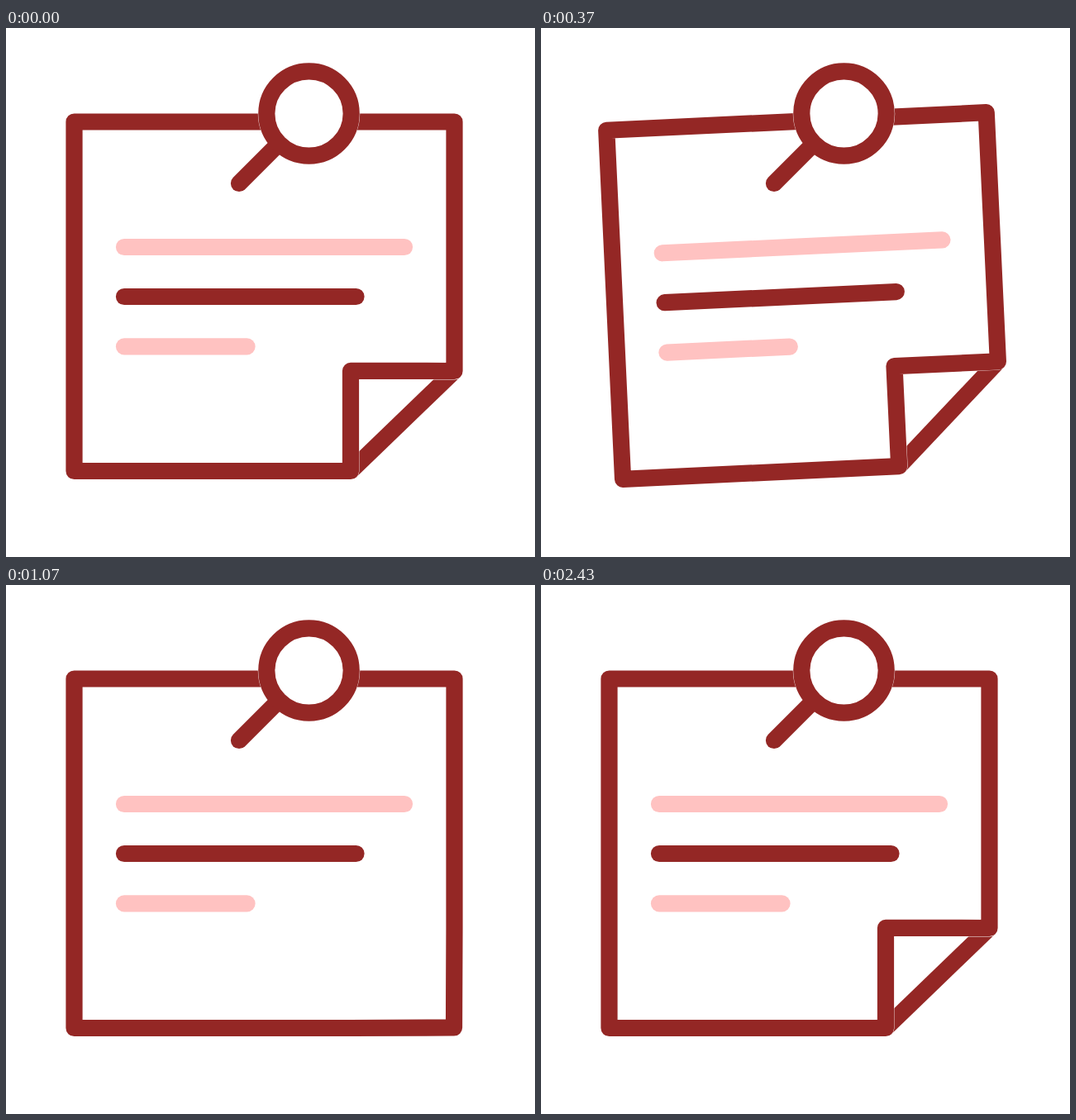
These frames come from a looping animation (640 by 640 pixels, 2500 ms). An HTML page:

```html
<!DOCTYPE html>
<html lang="en">
<head>
<meta charset="utf-8">
<title>Pinned note</title>
<style>
  html, body { margin: 0; width: 100%; height: 100%; overflow: hidden; background: #fff; }
  svg { display: block; width: 100%; height: 100%; }
  .ink { stroke: #942725; stroke-width: 20.2; }
  .soft { stroke: #ffc2c1; stroke-width: 20.2; }
  .seam { stroke: #fff; stroke-width: 20.9; }
  .round { stroke-linecap: round; stroke-linejoin: round; }
</style>
</head>
<body>
<svg viewBox="0 0 640 640" fill="none">
  <g id="note">
    <path class="ink" d="M542.5 415L417 536"/>
    <path id="halo" class="seam round" fill="#fff"/>
    <path id="sheet" class="ink round" fill="#fff"/>
    <path class="soft round line"/>
    <path class="ink round line"/>
    <path class="soft round line"/>
  </g>
  <circle cx="366.5" cy="103.5" r="61.7" fill="#fff"/>
  <path class="ink round" d="M282 188L330 140"/>
  <circle class="ink" cx="366.5" cy="103.5" r="51.2" fill="#fff"/>
</svg>
<script>
const LOOP = 2500, STEP = 100 / 3;
const PIVOT = '300 188';

// Keys are [frame, value]; frames run at 30 per second.
const SWING = [[1, 0], [6, 4], [10, -3], [15, 0]];
const FOLDED = [417, 414.8], LIFTED = [404.5, 395.5], FLAT = [542.5, 536];

// Each line is wiped away from the left, then redrawn after a short lag.
const LINES = [
  { y: 265, end: 482, span: 9.8, lag: 3.4 },
  { y: 325, end: 423.5, span: 7.7, lag: 2.9 },
  { y: 385.4, end: 291.5, span: 9.8, lag: 2.8 }
];
const LEFT = 143, WIPE = 17;

const note = document.getElementById('note');
const sheet = document.getElementById('sheet');
const halo = document.getElementById('halo');
const linePaths = document.querySelectorAll('.line');

function ease(f, from, to) {
  const u = Math.min(1, Math.max(0, (f - from) / (to - from)));
  return u * u * (3 - 2 * u);
}

const mix = (a, b, u) => a + (b - a) * u;
const mixPoint = (a, b, u) => a.map((v, i) => mix(v, b[i], u));

function swing(f) {
  let angle = 0;
  for (let i = 1; i < SWING.length; i++) {
    const [from, a] = SWING[i - 1], [to, b] = SWING[i];
    if (f >= from) angle = mix(a, b, ease(f, from, to));
  }
  return angle;
}

function corner(f) {
  if (f < 18) return mixPoint(FOLDED, LIFTED, ease(f, 12, 18));
  const open = mixPoint(LIFTED, FLAT, ease(Math.min(f, 32), 18, 32.5));
  return f < 62 ? open : mixPoint(open, FOLDED, ease(f, 60.4, 73));
}

function linePath({ y, end, span, lag }, f) {
  const wiped = ease(f, WIPE, WIPE + span);
  const drawn = ease(f, WIPE + lag, WIPE + lag + span);
  const piece = (a, b) => b > a
    ? `M${mix(LEFT, end, a)} ${y}H${mix(LEFT, end, b)}` : '';
  return piece(0, drawn) + piece(wiped, 1);
}

function draw(time) {
  const f = Math.floor((time % LOOP + 3.4) / STEP);
  const d = `M82.5 113.5H542.5V415L${corner(f).join(' ')}L417 536H82.5Z`;
  sheet.setAttribute('d', d);
  halo.setAttribute('d', d);
  note.setAttribute('transform', `rotate(${swing(f)} ${PIVOT})`);
  LINES.forEach((line, i) => linePaths[i].setAttribute('d', linePath(line, f)));
}

const start = performance.now();
function tick() {
  draw(performance.now() - start);
  requestAnimationFrame(tick);
}
tick();
</script>
</body>
</html>
```
